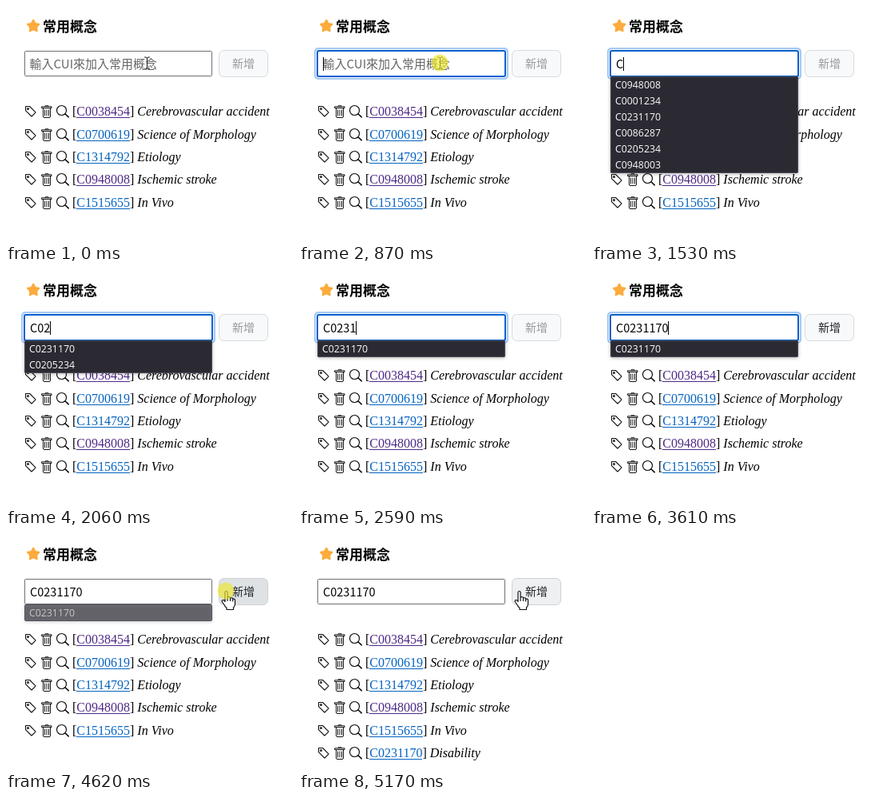
Recreate the animation shown at these times as an HTML page with a canvas. Size 359 by 295 pixels, loop 5630 ms.

```html
<!DOCTYPE html>
<html lang="zh-Hant">
<head>
<meta charset="utf-8">
<style>
html, body { margin: 0; width: 100%; height: 100%; overflow: hidden; background: #fff; }
canvas { display: block; }
</style>
</head>
<body>
<canvas id="stage" width="359" height="295"></canvas>
<script>
const ctx = document.getElementById('stage').getContext('2d');
const LOOP = 5630;
const CJK = '"Noto Sans CJK TC", "Noto Sans CJK JP", "Noto Sans CJK", sans-serif';
const SANS = '"Open Sans", "Noto Sans", sans-serif';
const SERIF = '"Liberation Serif", serif';
const BLUE = '#0563c1', PURPLE = '#4f2a86';

const concepts = [
  ['C0038454', 'Cerebrovascular accident', PURPLE],
  ['C0700619', 'Science of Morphology', BLUE],
  ['C1314792', 'Etiology', BLUE],
  ['C0948008', 'Ischemic stroke', PURPLE],
  ['C1515655', 'In Vivo', BLUE],
  ['C0231170', 'Disability', BLUE]
];

// [time, value] lists; the latest entry holds until the next one
const typed = [[0, ''], [1400, 'C'], [1730, 'C0'], [1930, 'C02'], [2390, 'C023'],
  [2590, 'C0231'], [2740, 'C02311'], [2860, 'C023117'], [3070, 'C0231170']];
const suggestions = [
  [0, []],
  [1470, ['C0948008', 'C0001234', 'C0231170', 'C0086287', 'C0205234', 'C0948003']],
  [1790, ['C0948008', 'C0001234', 'C0231170', 'C0205234', 'C0086287', 'C0948003']],
  [2000, ['C0231170', 'C0205234']],
  [2460, ['C0231170']],
  [4760, []]
];
const caretOn = [[0, false], [870, true], [3070, false], [3610, true], [3880, false]];

const at = (keys, t) => keys.filter(k => k[0] <= t).pop()[1];
const between = (t, a, b) => t >= a && t < b;

function box(x, y, w, h, r, fill, stroke) {
  ctx.beginPath();
  ctx.roundRect(x, y, w, h, r);
  if (fill) { ctx.fillStyle = fill; ctx.fill(); }
  if (stroke) { ctx.strokeStyle = stroke; ctx.lineWidth = 1; ctx.stroke(); }
}

function text(s, x, y, font, color) {
  ctx.font = font;
  ctx.fillStyle = color;
  ctx.fillText(s, x, y);
  return x + ctx.measureText(s).width;
}

function shape(d, x, y, { fill, stroke, width = 1 }) {
  const path = new Path2D(d);
  ctx.save();
  ctx.translate(x, y);
  ctx.lineJoin = ctx.lineCap = 'round';
  ctx.lineWidth = width;
  if (fill) { ctx.fillStyle = fill; ctx.fill(path); }
  if (stroke) { ctx.strokeStyle = stroke; ctx.stroke(path); }
  ctx.restore();
}

function star(cx, cy) {
  let d = '';
  for (let i = 0; i < 10; i++) {
    const r = i % 2 ? 4.1 : 7.6, a = i * Math.PI / 5 - Math.PI / 2;
    d += (i ? 'L' : 'M') + (r * Math.cos(a)) + ' ' + (r * Math.sin(a));
  }
  shape(d + 'Z', cx, cy, { fill: '#fdab3d', stroke: '#fdab3d', width: 2 });
}

const ICONS = [
  [23, 1.1, 'M2 1.5H6.6L14 8.9V9.1L9.1 14H8.9L1.5 6.6V2ZM5.5 4.5A1 1 0 1 1 3.5 4.5A1 1 0 1 1 5.5 4.5'],
  [43, 1, 'M2 1.8H14V3.6H2ZM6 1.5V.8H10V1.5M3.5 4V14Q3.5 15.5 5 15.5H11Q12.5 15.5 12.5 14V4M5.5 6V13M8 6V13M10.5 6V13'],
  [63, 1.2, 'M12.5 6.5A6 6 0 1 1 .5 6.5A6 6 0 1 1 12.5 6.5M10.8 10.8L15.1 15.1L15.4 14.8L11.1 10.6']
];

function conceptRow([id, name, color], i) {
  const y = Math.round(137.1 + 28.4 * i);
  for (const [x, width, d] of ICONS) shape(d, x, y - 13, { stroke: '#111', width });
  let x = text('[', 83, y, '16px ' + SERIF, '#000');
  const end = text(id, x, y, '16px ' + SERIF, color);
  ctx.fillRect(Math.round(x), y + 2, Math.round(end - x), 1);
  x = text('] ', end, y, '16px ' + SERIF, '#000');
  text(name, x, y, 'italic 16px ' + SERIF, '#000');
}

function inputField(t) {
  if (between(t, 870, 4560)) {
    box(19, 52, 243, 40, 5, '#a5c8f2');
    box(21, 54, 239, 36, 4, '#f4f9fe');
    box(22, 55, 237, 34, 3, '#0560cf');
    box(24, 57, 233, 30, 1, '#fff');
  } else {
    box(23.5, 56.5, 234, 31, 1, '#fff', '#6f6f78');
  }
  const value = at(typed, t);
  let x = 30;
  if (value) x = text(value, x, 78, '14.5px ' + CJK, '#000');
  else text('輸入CUI來加入常用概念', 29.5, 78, '300 15px ' + CJK, '#666');
  if (at(caretOn, t)) {
    ctx.fillStyle = '#000';
    ctx.fillRect(Math.floor(x), 64, 1, 17);
  }
}

function dropdown(t) {
  const items = at(suggestions, t);
  if (!items.length) return;
  ctx.save();
  ctx.globalAlpha = t < 1530 ? 0.6 : t >= 4690 ? 0.3 : t >= 4620 ? 0.65 : 1;
  ctx.shadowColor = 'rgba(0,0,0,.3)';
  ctx.shadowBlur = 4;
  ctx.shadowOffsetY = 1;
  box(23, 88, 235, 20 * items.length + 1, 2, '#2b2a33');
  ctx.shadowColor = 'transparent';
  box(23.5, 88.5, 234, 20 * items.length, 2, null, '#4c4b56');
  items.forEach((s, i) => text(s, 29, 103 + Math.round(19.9 * i), '12.3px ' + SANS, '#fbfbfe'));
  ctx.restore();
}

function button(t, hover) {
  const pressed = between(t, 4560, 4690);
  box(266.5, 55.5, 61, 33, 6, pressed ? '#dfe2e4' : hover ? '#eef0f1' : '#f8f9fa', hover ? '#cdd2d6' : '#d5dade');
  text('新增', 283, 77, '14px ' + CJK, t < 3070 ? '#96999c' : '#212529');
}

function glow(x, y) {
  ctx.beginPath();
  ctx.arc(x, y, 10.5, 0, 7);
  ctx.fillStyle = 'rgba(236,230,40,.65)';
  ctx.fill();
}

function cursor(t, x, y) {
  if (x < 262) {
    shape('M-3 -7.5H-1L0 -6.5L1 -7.5H3M0 -6.5V6.5M-3 7.5H-1L0 6.5L1 7.5H3', x + .5, y + .5, { stroke: '#111' });
  } else {
    shape('M-1.5 11V1.5Q-1.5 0 0 0Q1.6 0 1.6 1.5V7.5Q4.8 6.5 5 8.5Q8 7.6 8.2 9.8Q11 9 11 11.5V16Q11 18.5 9 20.5V23H.5V21Q-1.5 19.5 -2.5 17L-5 13.5Q-6 11.5 -4.2 11Q-2.8 10.8 -1.5 13ZM1.6 7.5V12M5 8.5V12M8.2 9.8V12.5',
      x + .5, y + .5, { fill: '#fff', stroke: '#111', width: 1.2 });
  }
  if (between(t, 870, 940) || between(t, 4560, 4690)) glow(x, y);
}

function pointer(t) {
  if (t < 1400) return [176, 71];
  if (t < 3880) return null;
  const step = Math.min(8, Math.floor((t - 3880) / 68.5) + 1);
  const p = step / 8, ease = p * p * (3 - 2 * p);
  return [Math.round(176 + 99 * ease), 71];
}

function draw(t) {
  ctx.fillStyle = '#fff';
  ctx.fillRect(0, 0, 359, 295);
  star(34.2, 25.2);
  text('常用概念', 46, 32, 'bold 17px ' + CJK, '#000');
  concepts.slice(0, t < 5170 ? 5 : 6).forEach(conceptRow);
  const pos = pointer(t);
  inputField(t);
  button(t, t >= 3880 && pos[0] >= 266);
  dropdown(t);
  if (pos) cursor(t, ...pos);
}

const start = performance.now();
function tick() {
  draw((performance.now() - start) % LOOP);
  requestAnimationFrame(tick);
}
tick();
</script>
</body>
</html>
```
